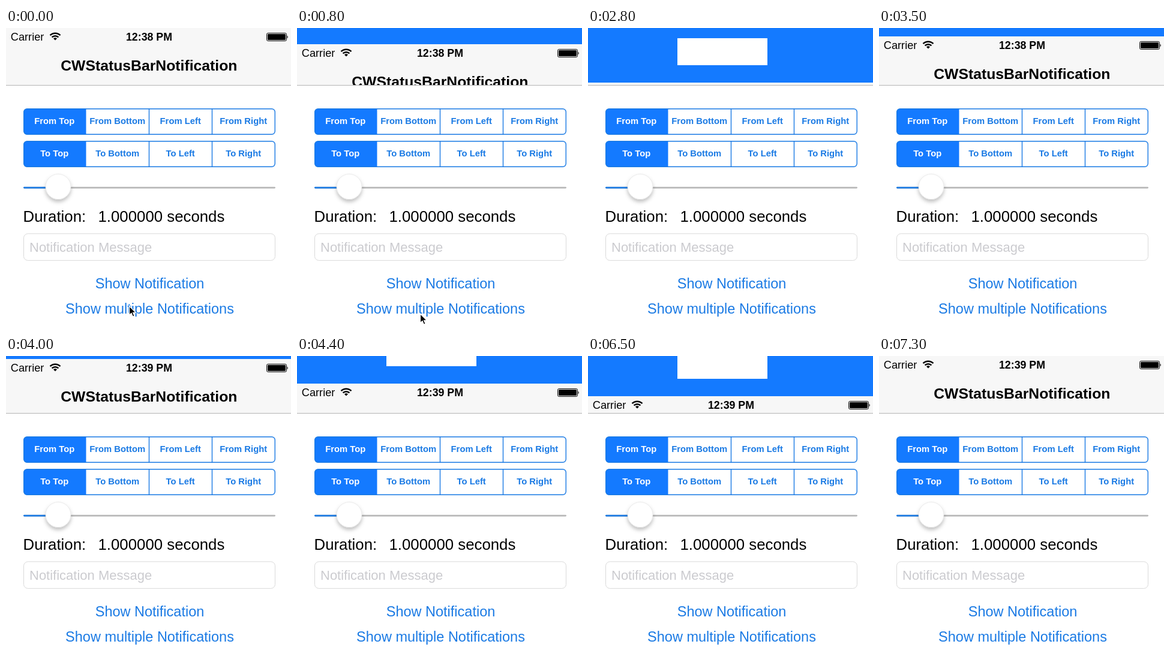
Write an HTML page that moves like this. It is 475x500 px and loops after 7.4 s.

```html
<!DOCTYPE html>
<html lang="en">
<head>
<meta charset="utf-8">
<title>Status bar notification</title>
<style>
  html, body { margin: 0; width: 100%; height: 100%; overflow: hidden; background: #fff; }
  svg { display: block; width: 475px; height: 500px; font-family: "Liberation Sans", Arial, sans-serif; }
  .bold { font-weight: bold; }
  .mid { text-anchor: middle; }
  .blue { fill: #147aff; }
  .ink { fill: #1a7ae4; }
  .line { fill: none; stroke: #1a7ae4; stroke-width: 1.4; }
</style>
</head>
<body>
<svg viewBox="0 0 475 500">
  <defs>
    <clipPath id="topClip"><rect width="475" height="96"/></clipPath>
    <filter id="shadow" x="-40%" y="-40%" width="180%" height="190%">
      <feDropShadow dx="0" dy="4" stdDeviation="3" flood-color="#000" flood-opacity=".25"/>
    </filter>
  </defs>
  <rect width="475" height="500" fill="#fff"/>

  <g clip-path="url(#topClip)">
    <rect width="475" height="95" fill="#f7f7f7"/>
    <g id="bar">
      <text x="7.8" y="21" font-size="18.2">Carrier</text>
      <g fill="none" stroke="#000" stroke-width="2.5">
        <path d="M73.5 12.2A12 12 0 0 1 90.5 12.2"/>
        <path d="M76.6 15.4A7.6 7.6 0 0 1 87.4 15.4"/>
      </g>
      <path d="M82 20.5L79 17.5A4.2 4.2 0 0 1 85 17.5Z"/>
      <text id="clock" class="bold mid" x="238.5" y="21" font-size="17.8"></text>
      <rect x="434.5" y="8.5" width="33" height="13" rx="2.2" fill="none" stroke="#000"/>
      <rect x="436" y="10" width="30" height="10" rx="1"/>
      <path d="M468.6 12.5Q471 15 468.6 17.5Z"/>
      <text class="bold mid" x="238.3" y="70.5" font-size="24.75">CWStatusBarNotification</text>
    </g>
    <rect y="95" width="475" height="1" fill="#b4b4b4"/>
    <g id="banner">
      <rect class="blue" width="475" height="96"/>
      <rect x="149" y="22" width="150" height="45" fill="#fff"/>
    </g>
  </g>

  <g id="segments"></g>

  <rect x="29" y="264.7" width="420" height="2.8" rx="1.4" fill="#b7b7b7"/>
  <rect class="ink" x="29" y="264.7" width="58" height="2.8" rx="1.4"/>
  <circle cx="87" cy="264.5" r="21" fill="#fff" stroke="#ddd" stroke-width=".6" filter="url(#shadow)"/>

  <g font-size="25.8">
    <text x="28.5" y="323">Duration:</text>
    <text x="153.5" y="323">1.000000 seconds</text>
  </g>
  <rect x="29.5" y="342.8" width="419" height="44.6" rx="7" fill="#fff" stroke="#dadada"/>
  <text x="39" y="372.5" font-size="22" fill="#cbcbcf">Notification Message</text>
  <g class="ink mid" font-size="23.5">
    <text x="239.5" y="433.5">Show Notification</text>
    <text x="239.5" y="475.5">Show multiple Notifications</text>
  </g>
  <path id="cursor" d="M0 0V15L3.4 11.8L6 17.6L8.6 16.5L6.1 10.8H10.8Z" stroke="#fff" stroke-width="1.2"/>
</svg>
<script>
  const LOOP = 7400, STEP = 100, SLIDE = 1200, HEIGHT = 96;
  const shows = [{ enter: 360, leave: 2615 }, { enter: 3815, leave: 6039 }];
  const el = id => document.getElementById(id);
  const clamp = v => Math.min(1, Math.max(0, v));
  const move = (id, x, y) => el(id).setAttribute("transform", `translate(${x} ${y})`);

  function segmentRow(prefix, y) {
    const labels = ["Top", "Bottom", "Left", "Right"].map((side, i) =>
      `<text class="bold mid ${i ? "ink" : ""}" x="${80.7 + i * 105}" y="${y + 26}" font-size="14.8"
        fill="#fff">${prefix} ${side}</text>`).join("");
    return `<path class="blue" d="M133.5 ${y + .5}H35a5.5 5.5 0 0 0-5.5 5.5v32a5.5 5.5 0 0 0 5.5 5.5h98.5z"/>
      <rect class="line" x="29.7" y="${y + .7}" width="418.6" height="42.6" rx="5.5"/>
      <path class="line" d="M238.5 ${y}v44M343.5 ${y}v44"/>${labels}`;
  }
  el("segments").innerHTML = segmentRow("From", 134) + segmentRow("To", 188);

  // Symmetric ease-in-out, cubic-bezier(.42, 0, .58, 1)
  function ease(x) {
    let lo = 0, hi = 1;
    for (let i = 0; i < 24; i++) {
      const u = (lo + hi) / 2, v = 1 - u;
      if (1.26 * u * v * v + 1.74 * u * u * v + u ** 3 < x) lo = u; else hi = u;
    }
    return lo * lo * (3 - 2 * lo);
  }

  const progress = (t, start) => ease(clamp((t - start) / SLIDE));

  function draw(t) {
    const shown = shows.reduce((sum, s) => sum + progress(t, s.enter) - progress(t, s.leave), 0);
    const drop = Math.round(HEIGHT * shown);
    move("bar", 0, drop);
    move("banner", 0, drop - HEIGHT);
    el("clock").textContent = t < 3800 ? "12:38 PM" : "12:39 PM";
    const drift = ease(clamp((t - 100) / 700));
    move("cursor", 205.5, 463.5 + 13 * drift);
    el("cursor").style.display = t < 900 ? "" : "none";
  }

  function tick() {
    const t = performance.now() % LOOP;
    draw(Math.floor(t / STEP) * STEP);
    requestAnimationFrame(tick);
  }
  tick();
</script>
</body>
</html>
```
